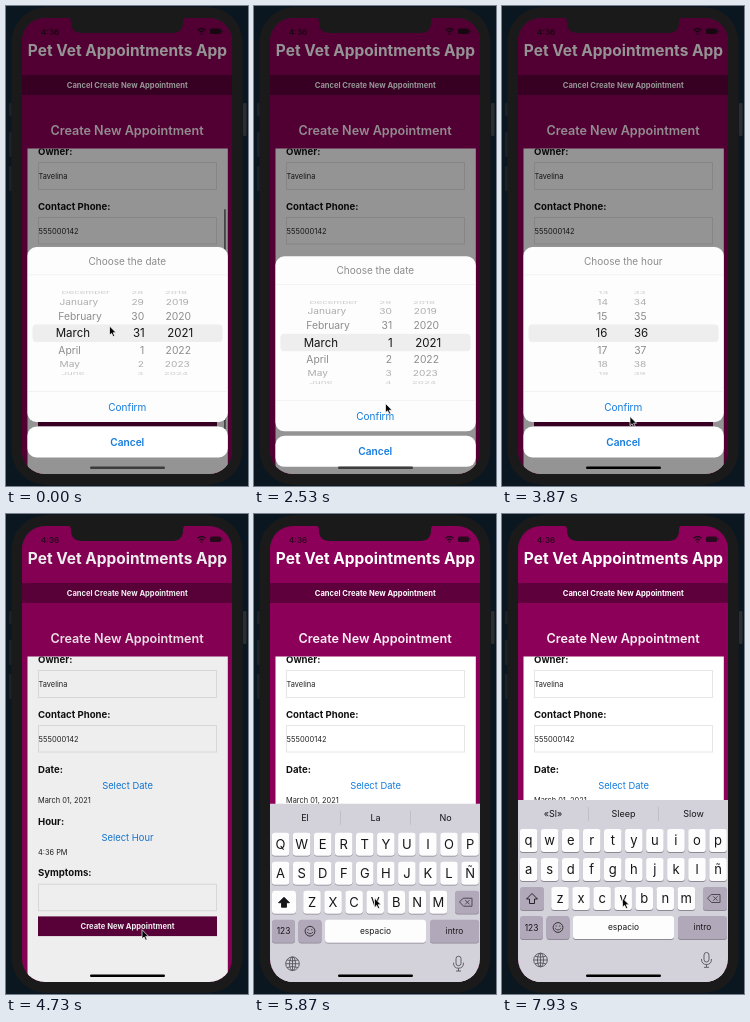
These frames come from a looping animation (242x480 px, 8 s). An HTML page:

```html
<!DOCTYPE html>
<html lang="en">
<head>
<meta charset="utf-8">
<title>Appointment form</title>
<style>
html, body { margin: 0; width: 100%; height: 100%; overflow: hidden; background: #0b1720; }
svg { display: block; width: 100%; height: 100%; font-family: Inter, Roboto, sans-serif; }
</style>
</head>
<body>
<svg id="stage" viewBox="0 0 242 480"></svg>
<script>
const LOOP = 8000;
const MAGENTA = '#8d0059', DARK = '#5e003c', BLUE = '#147bdc', BEZEL = '#1a1a1b';
const $ = id => document.getElementById(id);

// ---------- markup helpers ----------
const rect = (x, y, w, h, fill, r = 0, more = '') =>
  `<rect x="${x}" y="${y}" width="${w}" height="${h}" rx="${r}" fill="${fill}" ${more}/>`;
const text = (s, x, y, size, fill, more = '') =>
  `<text x="${x}" y="${y}" font-size="${size}" fill="${fill}" ${more}>${s}</text>`;
const mid = (s, x, y, size, fill, more = '') =>
  text(s, x, y, size, fill, 'text-anchor="middle" ' + more);
const bold = w => `font-weight="${w}"`;
const line = (d, more = '') =>
  `<path d="${d}" fill="none" stroke="#4c4a52" stroke-width="1" stroke-linecap="round" stroke-linejoin="round" ${more}/>`;

// ---------- app screen ----------
const label = (s, y) => text(s, 32, y, 9.6, '#111', bold(700));
const field = (y, h) => rect(32.5, y, 178, h, '#fff', 0, 'stroke="#e6e6e8"');

function app() {
  return rect(16, 12, 210, 456, MAGENTA) +
    text('4:36', 35, 29, 8, '#2a0a1e', bold(600)) +
    `<g fill="none" stroke="#2a0a1e" stroke-width="1.4">
      <path d="M191.5 24.2q4-3.6 8 0M193.3 26.2q2.2-1.8 4.4 0"/></g>` +
    `<circle cx="195.5" cy="28" r="1" fill="#2a0a1e"/>` +
    rect(204, 22.5, 11, 5.6, '#2a0a1e', 1.6) + rect(215.6, 24.2, 1, 2.2, '#2a0a1e') +
    mid('Pet Vet Appointments App', 121.4, 50, 15.45, '#fff', bold(700)) +
    rect(16, 69, 210, 20, DARK) +
    mid('Cancel Create New Appointment', 121.3, 82, 7.6, '#fff', bold(700)) +
    mid('Create New Appointment', 121, 129, 12.6, '#fbeff5', bold(600)) +
    `<g clip-path="url(#formClip)">` +
    rect(21, 142, 202, 330, '#fff') +
    label('Owner:', 148.7) + field(156.5, 27) + text('Tavelina', 32.6, 173, 7.4, '#222') +
    label('Contact Phone:', 203.7) + field(211.5, 26.5) + text('555000142', 32.6, 228, 7.5, '#222') +
    label('Date:', 258.8) + mid('Select Date', 121.5, 274.8, 9.4, BLUE) +
    text('', 32, 288.5, 7.4, '#222', 'id="date"') +
    label('Hour:', 310.7) + mid('Select Hour', 121.5, 326.8, 9.4, BLUE) +
    text('4:36 PM', 32, 340.5, 7.4, '#222', 'id="hour"') +
    `<g id="tail">` + label('Symptoms:', 360.7) + field(368.5, 26.5) +
    rect(32, 400.7, 179, 19.7, DARK) +
    mid('Create New Appointment', 121.5, 413.4, 7.65, '#fff', bold(700)) + `</g>` +
    rect(218, 203, 1.8, 225, '#777', 1, 'id="scroll"') + `</g>`;
}

// ---------- picker sheet ----------
const MONTHS = 'January February March April May June July August September October November December'.split(' ');
const wrap = (n, m) => ((n % m) + m) % m;
const pad = n => String(n).padStart(2, '0');
const wheels = {
  date: [
    { x: -71.3, anchor: 'start', at: 2, name: i => MONTHS[wrap(i, 12)] },
    { x: 17.8, anchor: 'end', at: 31, name: i => wrap(i - 1, 31) + 1 },
    { x: 53.2, anchor: 'middle', at: 2021, name: i => i }
  ],
  time: [
    { x: -21.5, anchor: 'middle', at: 16, name: i => pad(wrap(i, 24)) },
    { x: 18, anchor: 'middle', at: 36, name: i => pad(wrap(i, 60)) }
  ]
};

function wheelMarkup(id) {
  const rows = wheels[id].map((c, k) => {
    let out = '';
    for (let i = c.at - 4; i <= c.at + 5; i++)
      out += `<text id="${id}${k}_${i}" x="${c.x}" y="4" text-anchor="${c.anchor}">${c.name(i)}</text>`;
    return out;
  });
  return `<g id="${id}Wheel" clip-path="url(#wheelClip)">${rows.join('')}</g>`;
}

function turn(id, k, pos) {
  const c = wheels[id][k], step = 22.7 * Math.PI / 180;
  for (let i = c.at - 4; i <= c.at + 5; i++) {
    const el = $(`${id}${k}_${i}`), d = i - pos, a = d * step, off = Math.abs(d);
    const cos = Math.cos(a), picked = off < 0.5;
    el.setAttribute('display', off > 3.7 ? 'none' : 'inline');
    if (off > 3.7) continue;
    const sx = picked ? 1 : 0.97 - 0.08 * (1 - cos);
    el.setAttribute('transform',
      `translate(121 ${327.2 + 43.5 * Math.sin(a)}) scale(${sx} ${Math.max(cos, 0.1)})`);
    el.setAttribute('font-size', picked ? 11.5 : 10.7);
    const g = picked ? 20 : Math.min(212, 108 + 32 * off);
    el.setAttribute('fill', `rgb(${g},${g},${g})`);
  }
}

function sheet() {
  return `<g id="sheet">` + rect(21.4, 241, 200.4, 175, '#fdfdfd', 9) +
    mid('', 121.3, 258.6, 10, '#8c8c8c', 'id="sheetTitle"') +
    rect(22, 268.6, 199.5, 0.6, '#ececec') +
    rect(26.5, 318.5, 190, 17.5, '#eeeeef', 4) +
    wheelMarkup('date') + wheelMarkup('time') +
    rect(22, 385, 199.5, 0.6, '#ececec') +
    mid('Confirm', 121.3, 404.8, 10, BLUE) +
    rect(21.4, 420.5, 200.4, 31, '#fff', 9) +
    mid('Cancel', 121.3, 439.8, 10.1, BLUE, bold(600)) + `</g>`;
}

// ---------- keyboard ----------
const KEY = '#fdfdfe', SPECIAL = '#b1a8ba', INK = '#161618';
const key = (x, y, w, fill = KEY, id = '') =>
  rect(x, y + 0.9, w, 23, '#8d8894', 3) + rect(x, y, w, 23, fill, 3, id);

function letters(row, x0, y) {
  return [...row].map((c, i) => {
    const x = x0 + i * 21.05;
    return key(x - 8.8, y, 17.6) + mid(c, x, y + 16, 13, INK, 'class="letter"');
  }).join('');
}

function keyboard() {
  const bar = [51, 121.5, 191.5].map(x => mid('', x, 303, 9, INK, 'class="hint"')).join('');
  return `<g id="keyboard">` + rect(16, 286, 210, 190, '#d3d1da') + bar +
    rect(86, 293, 0.7, 14, '#b9b6c0') + rect(156, 293, 0.7, 14, '#b9b6c0') +
    letters('qwertyuiop', 26.6, 315) + letters('asdfghjklñ', 26.6, 344) +
    key(18, 373, 24, SPECIAL, 'id="shiftKey"') +
    `<path id="shift" d="M30 379.5l5.5 5.5h-3v4.5h-5V385h-3z" stroke="${INK}" stroke-width=".9" stroke-linejoin="round"/>` +
    letters('zxcvbnm', 58, 373) +
    key(201, 373, 24, SPECIAL) +
    line('M209.5 380.5h8.5v8h-8.5l-3.7-4zM211.5 382.6l3.8 3.8M215.3 382.6l-3.8 3.8') +
    key(18, 402, 23, SPECIAL) + mid('123', 29.5, 416.7, 8.4, INK) +
    key(44.5, 402, 23, SPECIAL) +
    `<circle cx="56" cy="413.5" r="4.9" fill="none" stroke="#333"/>` +
    line('M54.2 411.7v.6M57.8 411.7v.6M53.2 414.6q2.8 3 5.6 0') +
    key(71, 402, 101) + mid('espacio', 121.5, 416.4, 8.4, INK) +
    key(176, 402, 49, SPECIAL) + mid('intro', 200.5, 416.4, 8.4, INK) +
    `<g fill="none" stroke="#55535c" stroke-width=".9">
      <circle cx="38.5" cy="446" r="6.8"/><ellipse cx="38.5" cy="446" rx="3" ry="6.8"/>
      <path d="M31.7 446h13.6M38.5 439.2v13.6M33 442.2q5.5 2 11 0M33 449.8q5.5-2 11 0"/>
      <rect x="202" y="438.5" width="5" height="9.5" rx="2.5"/>
      <path d="M199.5 445q0 5.5 5 5.5t5-5.5M204.5 450.5v2.8M202 453.3h5"/></g></g>`;
}

// ---------- stage ----------
$('stage').innerHTML = `
  <defs>
    <clipPath id="screenClip">${rect(16, 12, 210, 456, '#000', 23)}</clipPath>
    <clipPath id="formClip">${rect(21.5, 142.6, 200.3, 326, '#000')}</clipPath>
    <clipPath id="wheelClip">${rect(22, 282, 200, 92, '#000')}</clipPath>
  </defs>` +
  rect(-20, -20, 300, 540, '#0b1720') +
  [[97, 13], [126, 25], [160, 25]].map(([y, h]) => rect(3, y, 3, h, '#1b2329', 1)).join('') +
  rect(237, 97, 3.5, 33, '#2b2e31', 1) +
  rect(5.5, 1, 231, 478, BEZEL, 35) +
  `<g clip-path="url(#screenClip)">` + app() +
  rect(16, 12, 210, 456, '#000', 0, 'id="shade"') + sheet() + keyboard() +
  rect(84, 460.4, 75, 2.7, '#000', 1.35, 'id="home"') + `</g>
  <path d="M60 11q5 0 5 5q0 11 11 11h90q11 0 11-11q0-5 5-5z" fill="${BEZEL}"/>
  <path id="cursor" d="M0 0v9.2l2.1-1.9 1.5 3.3 1.6-.7-1.5-3.2h2.9z" fill="#050505" stroke="#fff" stroke-width=".7"/>`;

const all = c => [...document.querySelectorAll(c)];
const letterEls = all('.letter'), hintEls = all('.hint');
const lower = letterEls.map(e => e.textContent);

// ---------- motion ----------
const part = (t, a, b) => Math.min(1, Math.max(0, (t - a) / (b - a)));
const smooth = p => p * p * (3 - 2 * p);
const inOut = p => p < 0.5 ? 4 * p ** 3 : 1 - 4 * (1 - p) ** 3;
const show = (id, on) => $(id).setAttribute('display', on ? 'inline' : 'none');

const DATE_OUT = 2460, TIME_IN = 3080, TIME_OUT = 4466, SLIDE = 330;
const FIRST_LETTER = 6680, SECOND_LETTER = 7490;

// time, x, y of the pointer tip
const path = [
  [0, 103.5, 320], [730, 130.5, 328], [860, 131, 329], [940, 134, 338], [1070, 134.5, 339],
  [1700, 134.5, 339], [1930, 134, 378], [2100, 134, 378], [2350, 131.5, 397.5], [2540, 131.5, 397.5],
  [2870, 125, 324], [3430, 125, 324], [3870, 128, 410.5], [4180, 123, 402], [4480, 123, 402],
  [4730, 136, 415.7], [5380, 120.5, 384], [LOOP, 120.5, 384]
];

function pointer(t) {
  const i = path.findIndex(p => p[0] > t);
  const [a, b] = [path[i - 1], path[i]];
  const p = smooth(part(t, a[0], b[0]));
  return [a[1] + (b[1] - a[1]) * p, a[2] + (b[2] - a[2]) * p];
}

function render(t) {
  const timeMode = t >= 2900;
  const opening = timeMode ? part(t, TIME_IN, TIME_IN + SLIDE) : 1;
  const start = timeMode ? TIME_OUT : DATE_OUT;
  const closing = part(t, start, start + SLIDE);
  const fade = smooth(part(t, start + 70, start + SLIDE));
  const drop = 235 * (1 - inOut(opening) + inOut(closing));
  $('sheet').setAttribute('transform', `translate(0 ${drop})`);
  show('sheet', drop < 234);
  $('shade').setAttribute('opacity', 0.42 * opening * (1 - fade));
  $('sheetTitle').textContent = timeMode ? 'Choose the hour' : 'Choose the date';
  show('dateWheel', !timeMode);
  show('timeWheel', timeMode);
  if (timeMode) {
    turn('time', 0, 16);
    turn('time', 1, 36);
  } else {
    turn('date', 0, 2);
    turn('date', 1, 31 + smooth(part(t, 1220, 1540)));
    turn('date', 2, 2021);
  }

  $('date').textContent = t < DATE_OUT ? 'March 31, 2021' : 'March 01, 2021';
  show('hour', t >= TIME_OUT);
  $('tail').setAttribute('transform', `translate(0 ${t >= TIME_OUT ? 1.7 : 0})`);
  $('scroll').setAttribute('opacity', 1 - part(t, 100, 500));
  $('home').setAttribute('fill', t < TIME_IN ? '#3c3c3c' : '#000');

  const up = part(t, 5580, 5980);
  $('keyboard').setAttribute('transform', `translate(0 ${184 * (1 - up) ** 3})`);
  show('keyboard', up > 0);
  const caps = t < FIRST_LETTER;
  letterEls.forEach((e, i) => e.textContent = caps ? lower[i].toUpperCase() : lower[i]);
  $('shiftKey').setAttribute('fill', caps ? KEY : SPECIAL);
  $('shift').setAttribute('fill', caps ? INK : 'none');
  const hints = caps ? ['El', 'La', 'No']
    : t < SECOND_LETTER ? ['«S»', 'Si', 'Se'] : ['«Sl»', 'Sleep', 'Slow'];
  hintEls.forEach((e, i) => e.textContent = hints[i]);

  $('cursor').setAttribute('transform', `translate(${pointer(t)})`);
}

function tick() {
  render(performance.now() % LOOP);
  requestAnimationFrame(tick);
}
tick();
</script>
</body>
</html>
```
